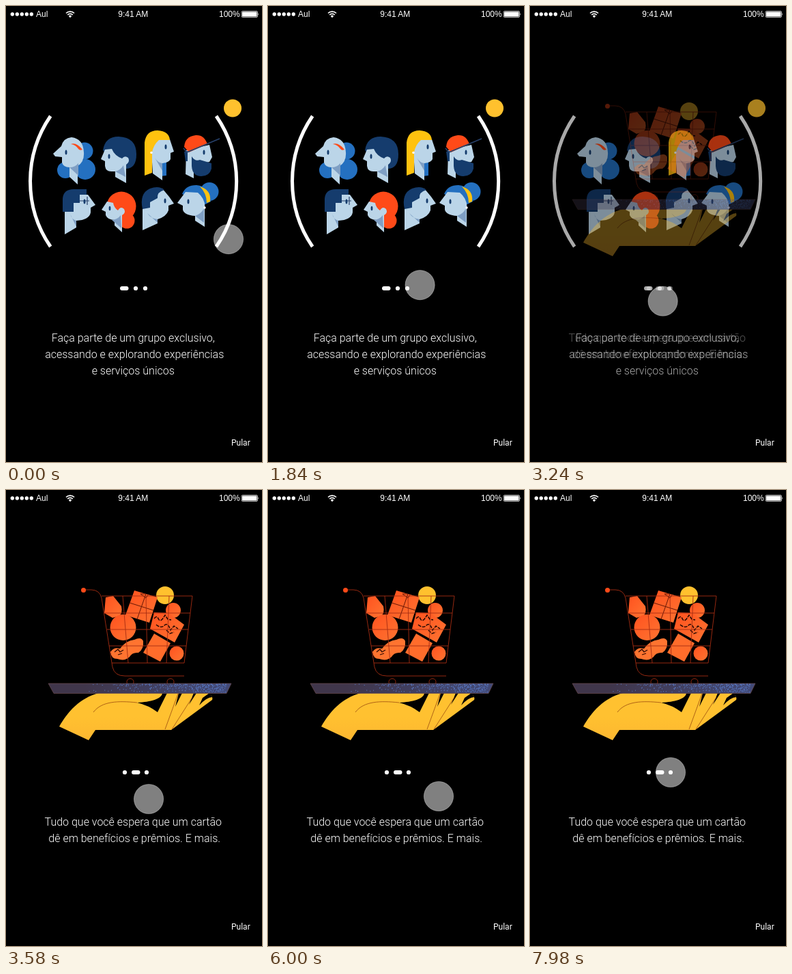
Write an HTML page that moves like this. It is 375 px wide and 667 px high and loops after 8000 ms.

```html
<!DOCTYPE html>
<html lang="pt">
<head>
<meta charset="utf-8">
<title>Boas-vindas</title>
<style>
  html, body { margin: 0; width: 100%; height: 100%; overflow: hidden; background: #000; }
  svg { display: block; width: 100%; height: 100%; }
  .status { font: 12px "Liberation Sans", sans-serif; }
  .copy { font: 300 16px Roboto, sans-serif; text-anchor: middle; white-space: pre; }
  .skip { font: 12px Roboto, sans-serif; }
  .white { fill: #fff; }
  .skin { fill: #bbd5e8; }
  .shade { fill: #7f9fc4; }
  .navy { fill: #153c6d; }
  .blue { fill: #2470c0; }
  .red { fill: #ff4a18; }
  .yellow { fill: #ffc20f; }
  .brand { fill: #ffc12e; }
  .wire { fill: none; stroke: #a52d12; stroke-width: .9; }
  .crease { fill: none; stroke: #a85a12; stroke-width: .9; }
</style>
</head>
<body>
<svg viewBox="0 0 375 667">
  <defs>
    <linearGradient id="goods" x1="0" y1="0" x2="1" y2="1">
      <stop stop-color="#ff521f"/><stop offset="1" stop-color="#ff7431"/>
    </linearGradient>
    <linearGradient id="tray">
      <stop offset=".2" stop-color="#40364b"/><stop offset="1" stop-color="#424a78"/>
    </linearGradient>
    <linearGradient id="hand" x2="0" y2="1">
      <stop offset=".5" stop-color="#ffc130"/><stop offset="1" stop-color="#fdb730"/>
    </linearGradient>
  </defs>
  <rect width="375" height="667"/>

  <g class="white status">
    <path d="M9.3 12h28.1" stroke="#fff" stroke-width="5.4" stroke-linecap="round" stroke-dasharray="0 7"/>
    <text x="44" y="16">Aul</text>
    <text x="164.300" y="16">9:41 AM</text>
    <text x="312" y="16">100%</text>
    <path d="M88 10.500a8.600 8.600 0 0 1 12 0M90.200 13a5.400 5.400 0 0 1 7.600 0" fill="none" stroke="#fff" stroke-width="1.700"/>
    <path d="M94 17.200l-2.200-2.400a3 3 0 0 1 4.400 0z"/>
    <rect x="345" y="7.500" width="23.500" height="9" rx="1.500" fill="none" stroke="#fff" stroke-width=".7"/>
    <rect x="346" y="8.500" width="21.500" height="7" rx=".6"/>
    <path d="M369.300 10.300q1.500 1.700 0 3.400z"/>
  </g>

  <g id="pageOne">
    <path d="M65.200 161A168.500 168.500 0 0 0 65.200 352M308 161A168.500 168.500 0 0 1 308 352"
      fill="none" stroke="#fff" stroke-width="5"/>
    <circle class="brand" cx="332" cy="149.500" r="13"/>

    <g><!-- woman with headband -->
      <g class="blue">
        <circle cx="115" cy="212" r="12.500"/><circle cx="116" cy="239" r="15"/><circle cx="87" cy="240" r="12"/>
      </g>
      <path class="skin" d="M81 205Q84 193 96 192Q113 194 114 214Q115 228 105 234V261L93 250V236Q84 236 82 229V221L72 220L69 216z"/>
      <path class="shade" d="M93 236Q101 236 106 230V248z"/>
      <path class="red" d="M95 202Q103 199 112 210Q108 212 106 209Q102 203 95 202z"/>
      <ellipse class="navy" cx="88" cy="214" rx="1.500" ry="3.500"/>
    </g>
    <g><!-- woman with round hair -->
      <path class="navy" d="M142 211Q145 191 165 191Q191 192 191 217Q191 238 175 238L158 232z"/>
      <path class="skin" d="M145 210L139 224L145 227V234Q146 242 154 242H160V250L176 259V232Q182 228 179 222Q174 218 170 223Q159 219 155 209z"/>
      <path class="shade" d="M160 242Q168 240 172 233L175 250z"/>
      <ellipse class="navy" cx="151" cy="220" rx="1.500" ry="3.500"/>
    </g>
    <g><!-- woman with long hair -->
      <path class="blue" d="M226 215H235V248L226 249z"/>
      <path class="skin" d="M212 195H240L246 213L241 215V224Q239 229 229 230V255L215 245z"/>
      <path class="shade" d="M229 230Q222 229 218 222L229 241z"/>
      <path class="yellow" d="M203 248V200Q205 182 222 182Q239 183 240 196H224Q216 203 214 214V244z"/>
      <circle class="white" cx="213" cy="214.500" r="1.700"/>
      <ellipse class="navy" cx="234" cy="206" rx="1.500" ry="3.500"/>
    </g>
    <g><!-- bearded man with cap -->
      <path class="skin" d="M264 211L298 203L302 221L298 228L275 233V252L263 246z"/>
      <path class="navy" d="M272 220Q277 228 284 225L301 230V238Q298 249 286 249Q273 249 272 234z"/>
      <path class="navy" d="M261 213L266 212V227H263z"/>
      <path class="red" d="M261 206Q262 191 278 189Q290 188 295 202L268 214z"/>
      <path d="M260 208L265 214L313 194" fill="none" stroke="#27406a" stroke-width="1.800"/>
      <ellipse class="navy" cx="290" cy="214" rx="1.500" ry="3.500"/>
    </g>
    <g><!-- man with glasses -->
      <path class="skin" d="M96 276H120L131 291L124 295V302Q122 313 103 314V324L86 334V292z"/>
      <path class="shade" d="M103 314Q96 312 94 304L103 323z"/>
      <path class="navy" d="M83 301V282Q84 268 99 268H118V276H108V288H99V301z"/>
      <path d="M108 285H122M119 279v12" fill="none" stroke="#27406a" stroke-width="1.200"/>
      <ellipse class="navy" cx="115" cy="286" rx="1.500" ry="3.500"/>
    </g>
    <g><!-- red-haired woman -->
      <circle class="red" cx="169" cy="293" r="21.500"/><circle class="red" cx="177" cy="314" r="11.500"/>
      <path class="skin" d="M148 286L140 298L146 301V306Q149 313 159 313V321L170 331V306Q176 303 173 297Q168 292 164 299Q158 295 157 288z"/>
      <path class="shade" d="M155 313Q164 312 168 306L169 325z"/>
      <ellipse class="navy" cx="152" cy="296" rx="1.400" ry="3.200"/>
    </g>
    <g><!-- man with side hair -->
      <path class="skin" d="M209 276L229 267L239 279L246 289L238 292V299Q235 308 222 312V318L200 328V290z"/>
      <path class="shade" d="M222 312Q212 311 207 303L222 317z"/>
      <path class="navy" d="M200 297Q195 274 211 267Q224 262 232 269Q221 272 222 281L211 287V295z"/>
      <ellipse class="navy" cx="233" cy="285" rx="1.500" ry="3.500"/>
    </g>
    <g><!-- woman with bun -->
      <circle class="blue" cx="298" cy="271.500" r="13.500"/>
      <path class="blue" d="M258 275Q263 262 279 262Q299 264 300 286L290 291z"/>
      <path class="skin" d="M263 272L251 288L259 292V298Q261 306 277 307V314L291 323V297Q293 283 281 273z"/>
      <path class="shade" d="M277 307Q286 304 290 296V317z"/>
      <path class="yellow" d="M284 264Q301 269 299 286L294 288Q294 274 284 264z"/>
      <circle class="white" cx="291" cy="295" r="1.700"/>
      <ellipse class="navy" cx="267" cy="286" rx="1.500" ry="3.500"/>
    </g>

    <g class="white">
      <rect x="167" y="410" width="12.500" height="6" rx="3"/>
      <circle cx="190" cy="413" r="3.100"/><circle cx="204" cy="413" r="3.100"/>
    </g>
    <g class="white copy">
      <text x="188.200" y="491">Faça parte de um grupo exclusivo,&nbsp;</text>
      <text x="188.200" y="515">acessando e explorando experiências</text>
      <text x="188.200" y="539">e serviços únicos&nbsp;</text>
    </g>
  </g>

  <g id="pageTwo">
    <circle class="brand" cx="233" cy="154" r="13"/>
    <g fill="url(#goods)">
      <path d="M146 157L157 155L169 170Q171 180 166 184L156 187L144 180z"/>
      <path d="M188 147L222 157L210 194L175 183z"/>
      <circle cx="171.500" cy="201" r="19"/>
      <circle cx="245" cy="176" r="11"/>
      <path d="M217 179L238 180L261 197L247 223L211 203z"/>
      <path fill="#ff7430" d="M153 237Q158 229 167 232Q176 220 188 219Q198 214 201 221Q202 233 194 238Q185 237 181 244Q174 251 163 247Q154 247 153 237z"/>
      <path fill="#ff6c2b" d="M217 210L241 224L226 251L201 238z"/>
      <circle cx="250" cy="239" r="10.500"/>
    </g>
    <g fill="none" stroke="#651806">
      <path d="M205 152L192 189M181 165L216 176M205 152l-8 0l8 6l4-6"/>
      <path d="M159 237l5-4l3 4l5-3M164 241l6-2" stroke="#300c04" stroke-width="1.300"/>
      <path d="M217 188q4-5 6 0t6 1l4-6 4 6 5 1M220 197q7 6 12 1t9 7l5-6 6 4M235 205l5 5 6-2" stroke="#1c0703" stroke-width="1.500" stroke-dasharray="5 1.500"/>
    </g>
    <g class="wire">
      <path d="M117 146H125Q137 146 140 158L156 259Q159 272 174 272H261"/>
      <path d="M140 155H273L261 253H155M144 180H270M148 204H267M151 228H264"/>
      <path d="M171 155L179 253M205 155L207 253M239 155L235 253"/>
      <path d="M177.500 283a5 5 0 1 1 9 0M236.500 283a5 5 0 1 1 9 0"/>
    </g>
    <circle class="red" cx="113.500" cy="146.500" r="3.500"/>

    <path fill="url(#hand)" d="M136 297H229C228 306 212 310 192 311Q209 315 222 325L236 297H296Q304 302 302 307L242 351H131L121 366L78 346C90 325 108 304 136 297z"/>
    <path d="M253 297H258L248 317zM275 297H279L268 314zM288 304L298 297L302 303Q294 303 283 315z"/>
    <path class="crease" d="M128 325C140 309 164 308 192 311M252 298L233 350M273 303L243 350"/>
    <path fill="url(#tray)" stroke="#6a4b4e" stroke-width=".7" d="M62 283H330L323 297.500H70z"/>
    <path id="specks" stroke="#5b7fce" stroke-width="1"/>

    <g class="white">
      <circle cx="174" cy="413" r="3.100"/><circle cx="206" cy="413" r="3.100"/>
      <rect x="184" y="410" width="12.500" height="6" rx="3"/>
    </g>
    <g class="white copy">
      <text x="188.200" y="491">Tudo que você espera que um cartão&nbsp;</text>
      <text x="188.200" y="515">dê em benefícios e prêmios. E mais.</text>
    </g>
  </g>

  <text class="white skip" x="330" y="643">Pular</text>
  <circle id="pointer" r="21.600" fill="#fff" fill-opacity=".5" stroke="#fff" stroke-opacity=".35"/>
</svg>
<script>
const DURATION = 8000;
const FADE_START = 3140, FADE_END = 3440;
// Pointer path: time, x, y
const PATH = [
  [0, 326, 341], [920, 286, 395], [2640, 189, 415], [2980, 189, 417],
  [3580, 209, 452], [4060, 230, 453], [4320, 230, 453], [4780, 246, 451],
  [5000, 250, 448], [6340, 250, 448], [6720, 221, 429], [7140, 210, 417],
  [7880, 206, 413], [8000, 206, 413]
];
const byId = id => document.getElementById(id);
const pageOne = byId('pageOne'), pageTwo = byId('pageTwo'), pointer = byId('pointer');

const slope = (i, axis) =>
  (PATH[i + 1][axis] - PATH[i][axis]) / (PATH[i + 1][0] - PATH[i][0]);

// Tangent that never overshoots a resting point
function tangent(i, axis) {
  if (i === 0) return slope(0, axis);
  if (i === PATH.length - 1) return 0;
  const before = slope(i - 1, axis), after = slope(i, axis);
  return before * after > 0 ? 2 * before * after / (before + after) : 0;
}

function along(time, axis) {
  const i = PATH.findIndex((key, n) => n + 1 < PATH.length && time < PATH[n + 1][0]);
  const span = PATH[i + 1][0] - PATH[i][0];
  const u = (time - PATH[i][0]) / span, v = 1 - u;
  return v * v * (1 + 2 * u) * PATH[i][axis] + u * u * (3 - 2 * u) * PATH[i + 1][axis]
    + span * u * v * (v * tangent(i, axis) - u * tangent(i + 1, axis));
}

function scatterSpecks() {
  let seed = 7, d = '';
  const random = () => (seed = seed * 16807 % 2147483647) / 2147483647;
  for (let i = 0; i < 330; i++) {
    const x = 120 + 202 * Math.sqrt(random());
    const y = 284 + 12 * random() ** 1.5;
    d += `M${x.toFixed(1)} ${y.toFixed(1)}h1`;
  }
  byId('specks').setAttribute('d', d);
}

function draw(now) {
  const time = now % DURATION;
  const fade = Math.min(1, Math.max(0, (time - FADE_START) / (FADE_END - FADE_START)));
  pageOne.setAttribute('opacity', 1 - fade);
  pageTwo.setAttribute('opacity', fade);
  pointer.setAttribute('cx', along(time, 1));
  pointer.setAttribute('cy', along(time, 2));
}

scatterSpecks();
const start = performance.now();
function tick() {
  draw(performance.now() - start);
  requestAnimationFrame(tick);
}
tick();
</script>
</body>
</html>
```
